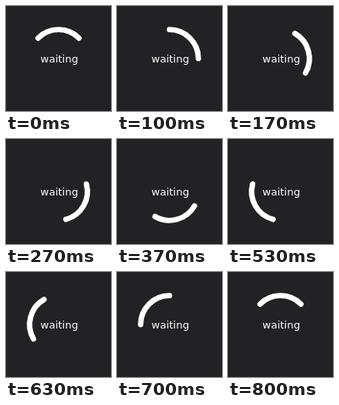
An HTML page for the animation above (830 ms loop, 132 by 132 pixels).

```html
<!DOCTYPE html>
<html lang="en">
<head>
<meta charset="utf-8">
<title>Waiting</title>
<style>
  html, body {
    margin: 0;
    width: 100%;
    height: 100%;
    overflow: hidden;
    background: #222224;
  }
  svg {
    display: block;
    width: 132px;
    height: 132px;
  }
  path {
    fill: none;
    stroke: #fff;
    stroke-width: 6.8;
    stroke-linecap: round;
  }
  text {
    fill: #fff;
    font: 400 13px Montserrat, "DejaVu Sans", sans-serif;
    text-anchor: middle;
  }
</style>
</head>
<body>
<svg viewBox="0 0 132 132">
  <path id="arc" d="M40.33 40.33A36.3 36.3 0 0 1 91.67 40.33"/>
  <text x="67" y="71">waiting</text>
</svg>
<script>
  const LOOP = 830;
  const STEP = 100 / 3;
  const TICK = 10;
  const arc = document.getElementById('arc');

  // 24 hard steps of 15 degrees, each starting on a 10 ms tick
  function angleAt(ms) {
    const tick = Math.floor((ms % LOOP) / TICK) * TICK;
    return 15 * Math.floor((tick + TICK / 2) / STEP);
  }

  function draw(now) {
    arc.setAttribute('transform', `rotate(${angleAt(now)} 66 66)`);
    requestAnimationFrame(draw);
  }
  requestAnimationFrame(draw);
</script>
</body>
</html>
```
